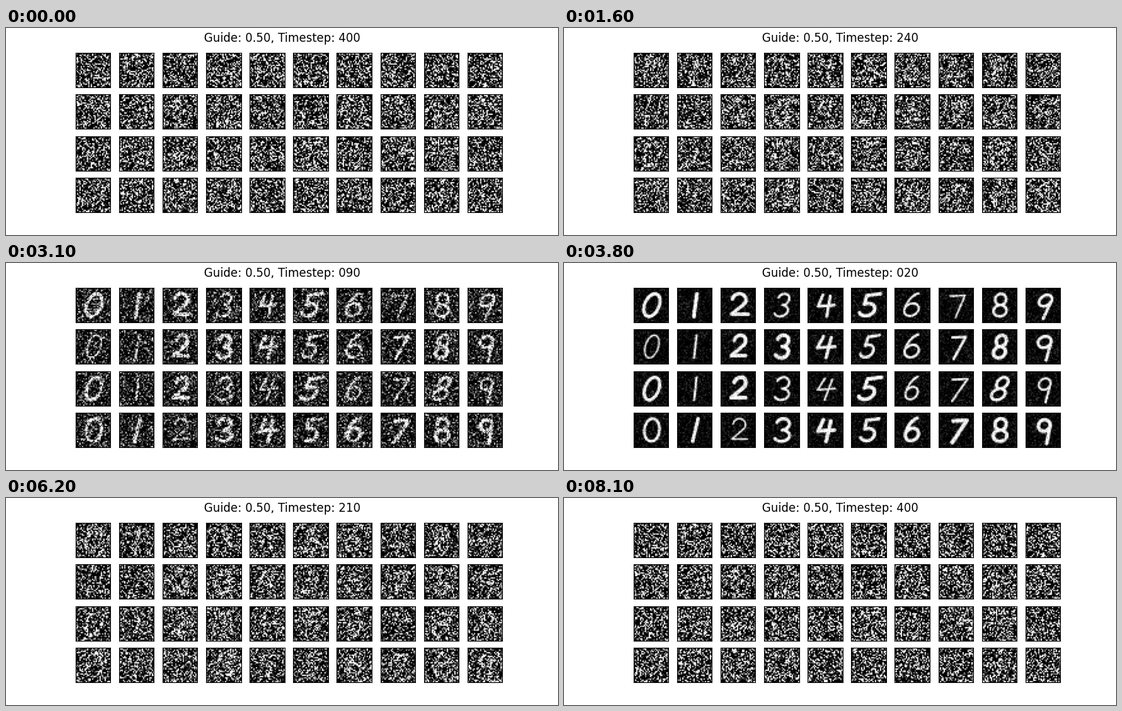
These frames come from a looping animation (800 px wide and 300 px high, 8200 ms). A matplotlib script:

```python
import numpy as np
import matplotlib.pyplot as plt
from matplotlib.animation import FuncAnimation

ROWS, COLS, SIZE = 4, 10, 28
STEPS, STRIDE = 400, 10
KEPT = STEPS // STRIDE


def arc(cx, cy, rx, ry, start, end):
    """Elliptic arc, angles in degrees, y pointing down."""
    a = np.radians(np.linspace(start, end, 60))
    return np.column_stack([cx + rx * np.cos(a), cy + ry * np.sin(a)])


def line(*points):
    """Polyline sampled densely."""
    u = np.linspace(0, len(points) - 1, 40 * (len(points) - 1) + 1)
    return np.column_stack([np.interp(u, range(len(points)), axis)
                            for axis in zip(*points)])


def shape(digit):
    """Points along a handwritten digit, in a box of -1 to 1."""
    if digit == 0:
        parts = [arc(0, 0, 0.65, 1, -60, 300)]
    elif digit == 1:
        parts = [line((0, -1), (0, 1))]
    elif digit == 2:
        parts = [arc(0, -0.45, 0.6, 0.55, -170, 40),
                 line((0.46, -0.1), (-0.6, 0.8), (0.85, 0.8))]
    elif digit == 3:
        parts = [arc(0, -0.5, 0.55, 0.5, -160, 90),
                 arc(0, 0.5, 0.65, 0.5, -90, 150)]
    elif digit == 4:
        parts = [line((-0.4, -0.9), (-0.7, 0.1), (0.8, 0)),
                 line((0.3, -0.8), (0.25, 1))]
    elif digit == 5:
        parts = [line((0.7, -1), (-0.4, -0.85), (-0.42, -0.08)),
                 arc(-0.1, 0.4, 0.65, 0.55, -120, 150)]
    elif digit == 6:
        parts = [arc(0.5, 0.4, 1.1, 1.5, -105, -180),
                 arc(0, 0.4, 0.6, 0.55, 180, -150)]
    elif digit == 7:
        parts = [line((-0.7, -0.8), (0.65, -0.85), (0, 1.1))]
    elif digit == 8:
        parts = [arc(0, -0.5, 0.5, 0.5, 90, 450),
                 arc(0, 0.5, 0.6, 0.5, -90, 270)]
    else:
        parts = [arc(0, -0.4, 0.55, 0.5, 0, -360),
                 line((0.55, -0.4), (0.4, 1.2))]
    return np.vstack(parts)


def pen(digit, rng):
    """Grey picture of a digit with its own slant, width and weight."""
    slant = rng.uniform(0.05, 0.4)
    width = rng.uniform(0.85, 1.05)
    half = rng.uniform(0.7, 1.6)
    u, v = shape(digit).T
    px = SIZE / 2 + 0.5 + 9 * (width * u - slant * v)
    py = SIZE / 2 + 0.3 + 9 * v
    y, x = np.mgrid[:SIZE, :SIZE] + 0.5
    dist = np.hypot(x[..., None] - px, y[..., None] - py).min(axis=-1)
    return np.clip(half + 0.5 - dist, 0, 1)


def diffuse(clean, rng):
    """Forward diffusion with a linear beta schedule, kept every STRIDE steps."""
    beta = np.linspace(1e-4, 0.02, STEPS)
    keep = np.sqrt((1 - beta).reshape(KEPT, STRIDE).prod(axis=1))
    states = [clean]
    for k in keep:
        noise = rng.standard_normal(clean.shape)
        states.append(k * states[-1] + np.sqrt(1 - k * k) * noise)
    # Clip before resampling so the specks keep their grey tones.
    return np.clip(states, 0, 1)


rng = np.random.default_rng(7)
clean = np.array([pen(c, rng) for r in range(ROWS) for c in range(COLS)])
states = diffuse(clean, rng)

fig, axes = plt.subplots(ROWS, COLS, figsize=(8, 3), dpi=100)
title = fig.suptitle("")
images = []
for ax, img in zip(axes.flat, clean):
    ax.set_xticks([])
    ax.set_yticks([])
    images.append(ax.imshow(img, cmap="gray", vmin=0, vmax=1))


def update(i):
    # Denoise to zero, hold one frame, then run back.
    k = KEPT - i if i <= KEPT else i - KEPT - 1
    title.set_text(f"Guide: 0.50, Timestep: {k * STRIDE:03d}")
    for im, data in zip(images, states[k]):
        im.set_data(data)
    return [title, *images]


anim = FuncAnimation(fig, update, frames=2 * (KEPT + 1), interval=100,
                     repeat=True, repeat_delay=0)
plt.show()
```
